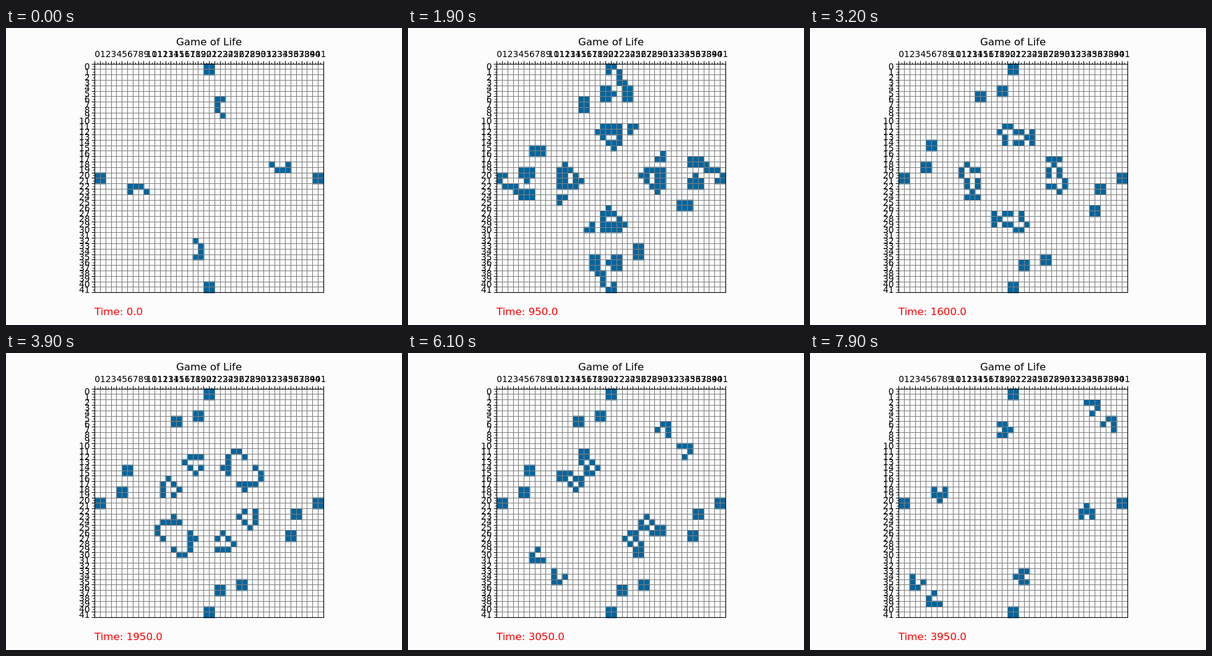
Animation of 640x480 px, one loop 8 s. Source, as an HTML page:

```html
<!DOCTYPE html>
<html>
<head>
<meta charset="utf-8">
<style>
  html, body { margin: 0; width: 100%; height: 100%; overflow: hidden; background: #fcfcfc; }
  svg { display: block; font-family: "DejaVu Sans", sans-serif; font-size: 13.89px; }
  .big { font-size: 16.67px; }
</style>
</head>
<body>
<svg width="640" height="480" viewBox="0 0 640 480">
  <path id="cells" fill="#00659e"/>
  <path id="grid" stroke="#808080" stroke-width="1.11" fill="none"/>
  <path id="ticks" stroke="#000" stroke-width="1.11" fill="none"/>
  <path id="minor" stroke="#000" stroke-width=".83" fill="none"/>
  <rect x="143.5" y="58.5" width="370" height="369" fill="none" stroke="#000" stroke-width="1.11"/>
  <text class="big" x="328" y="28" text-anchor="middle">Game of Life</text>
  <g id="labels"></g>
  <text class="big" id="clock" x="143" y="464" fill="#f00"></text>
</svg>
<script>
const N = 42, SIZE = 8.8, LEFT = 143.2, TOP = 57.6;
const STEP = 100, GENERATIONS = 80;
const $ = id => document.getElementById(id);
const snap = v => Math.round(v) + 0.5;
const px = i => snap(LEFT + SIZE * i);
const py = i => snap(TOP + SIZE * i);

function drawAxes() {
  let grid = '', ticks = '', minor = '', labels = '';
  for (let i = 0; i <= N; i++) {
    const x = px(i), y = py(i);
    grid += `M${x} 58.5V427.5M143.5 ${y}H513.5`;
    ticks += `M${x} 58.5v-4.9M143.5 ${y}h-4.9`;
    if (i === N) break;
    const mid = SIZE * (i + 0.5);
    minor += `M${px(i + 0.5)} 58.5v-2.8M143.5 ${py(i + 0.5)}h-2.8`;
    labels += `<text x="${LEFT + mid}" y="47" text-anchor="middle">${i}</text>` +
      `<text x="135.7" y="${Math.round(TOP + mid + 5)}" text-anchor="end">${i}</text>`;
  }
  $('grid').setAttribute('d', grid);
  $('ticks').setAttribute('d', ticks);
  $('minor').setAttribute('d', minor);
  $('labels').innerHTML = labels;
}

// The seed is symmetric under transposition and a half turn.
function seed() {
  const world = new Uint8Array(N * N);
  const quarter = [[0, 20], [0, 21], [1, 20], [1, 21],
                   [6, 22], [6, 23], [7, 22], [8, 22], [9, 23]];
  const last = N - 1;
  for (const [r, c] of quarter)
    for (const [a, b] of [[r, c], [c, r], [last - r, last - c], [last - c, last - r]])
      world[a * N + b] = 1;
  return world;
}

// Cells beyond the edge count as dead.
function evolve(world) {
  const at = (r, c) => r >= 0 && c >= 0 && r < N && c < N ? world[r * N + c] : 0;
  return world.map((alive, i) => {
    const r = Math.floor(i / N), c = i % N;
    let sum = -alive;
    for (let dr = -1; dr <= 1; dr++)
      for (let dc = -1; dc <= 1; dc++) sum += at(r + dr, c + dc);
    return sum === 3 || (alive && sum === 2) ? 1 : 0;
  });
}

// Each live cell is a square marker slightly larger than its grid box.
function cellPath(world) {
  let d = '';
  world.forEach((alive, i) => {
    if (!alive) return;
    const x = px(i % N + 0.5), y = py(Math.floor(i / N) + 0.5);
    d += `M${x - 5} ${y - 5}h10v10h-10Z`;
  });
  return d;
}

const paths = [];
for (let g = 0, world = seed(); g < GENERATIONS; g++, world = evolve(world))
  paths.push(cellPath(world));

let shown = -1;
function frame() {
  const g = Math.floor(performance.now() / STEP) % GENERATIONS;
  if (g !== shown) {
    shown = g;
    $('cells').setAttribute('d', paths[g]);
    $('clock').textContent = `Time: ${(g * 50).toFixed(1)}`;
  }
  requestAnimationFrame(frame);
}

drawAxes();
frame();
</script>
</body>
</html>
```
